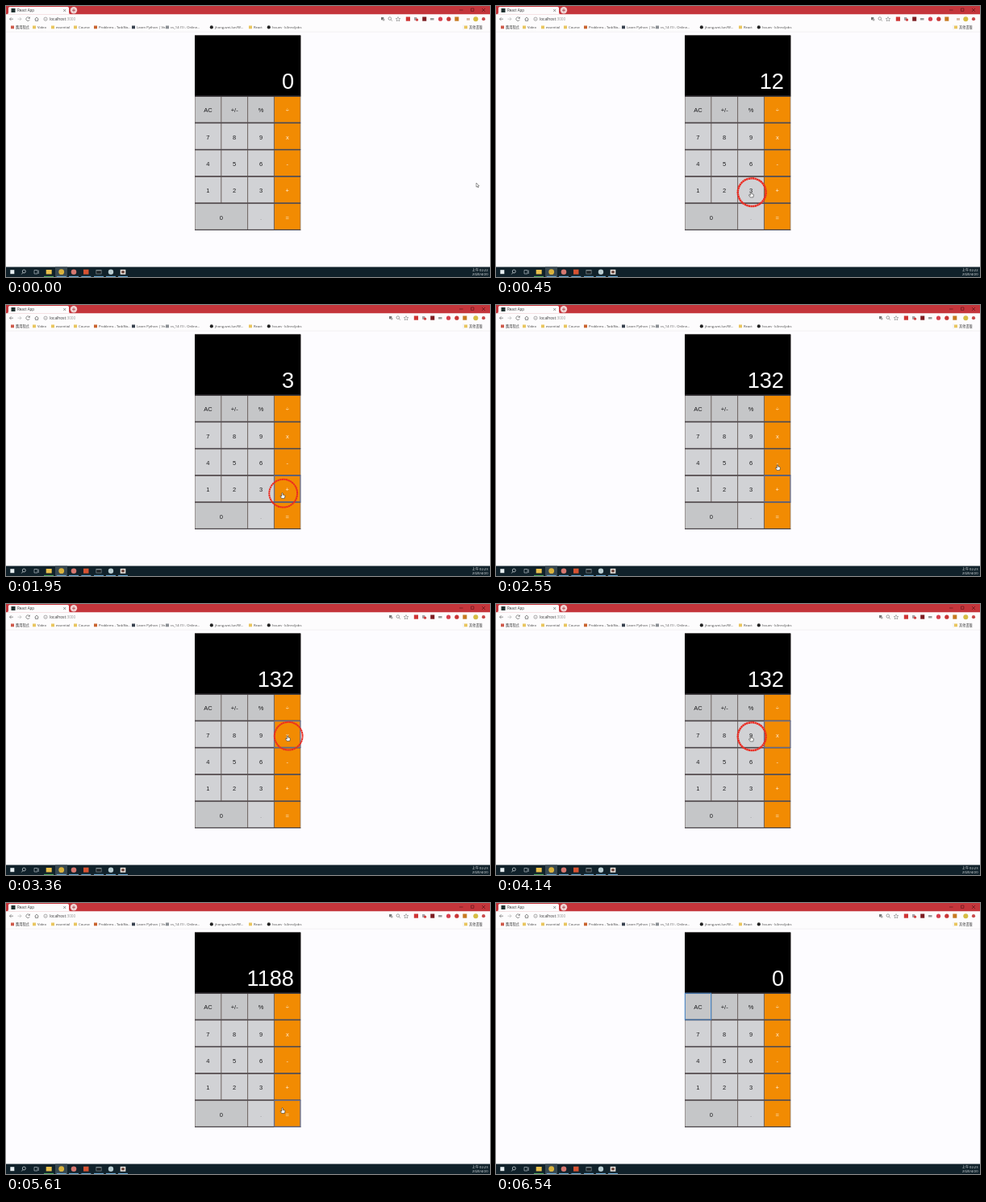
Animation of 600 by 337 pixels, one loop 6600 ms. Source, as an HTML page:

```html
<!DOCTYPE html>
<html lang="zh-Hant">
<head>
<meta charset="utf-8">
<title>Calculator demo</title>
<style>
html, body { margin: 0; width: 100%; height: 100%; overflow: hidden; background: #fdfcff; }
svg { display: block; width: 100vw; height: 100vh; }
text { font-family: "Liberation Sans", Arial, sans-serif; }
.ui { font-family: "Open Sans", "Noto Sans CJK TC", "Noto Sans CJK", sans-serif; }
</style>
</head>
<body>
<svg id="stage" viewBox="0 0 600 337" preserveAspectRatio="none"></svg>
<script>
const NS = "http://www.w3.org/2000/svg";
const stage = document.getElementById("stage");
const LOOP = 6600, STEP = 30;

function add(tag, attrs, parent = stage) {
  const el = document.createElementNS(NS, tag);
  for (const key in attrs) el.setAttribute(key, attrs[key]);
  parent.appendChild(el);
  return el;
}
const rect = (x, y, width, height, fill, parent) => add("rect", { x, y, width, height, fill }, parent);
const dot = (cx, cy, r, fill, parent) => add("circle", { cx, cy, r, fill }, parent);
const line = (d, stroke, width = 0.7, parent) =>
  add("path", { d, stroke, "stroke-width": width, fill: "none" }, parent);
function label(str, x, y, size, fill, more = {}, parent) {
  const el = add("text", { x, y, "font-size": size, fill, ...more }, parent);
  el.textContent = str;
  return el;
}
const ui = (str, x, y, size, fill, more = {}) => label(str, x, y, size, fill, { class: "ui", ...more });

// Browser window
rect(0, 0, 600, 337, "#fdfcff");
rect(0, 0, 600, 10.5, "#c4353b");
add("path", { d: "M1 10.5 Q3 10 3 8 V2.5 Q3 1 5 1 H76 Q78 1 78 2.5 V8 Q78 10 80 10.5Z", fill: "#fdfcfd" });
rect(6.5, 3, 5, 5, "#20302f");
ui("React App", 14, 7.4, 4.5, "#333");
line("M71.2 4 l3 3 m0 -3 l-3 3", "#555", 0.6);
dot(84, 5.3, 4.2, "#f0d4d4");
line("M82 5.3 h4 M84 3.3 v4", "#a3333a", 0.7);
line("M562 5 h4.5 M576.5 3 h3.4 v3.4 h-3.4z M590 3 l4 4 m0 -4 l-4 4", "#4d1518", 0.6);

rect(0, 10.5, 600, 21.5, "#fdfcfd");
line("M9 16.2 H4.5 m2 -2 l-2 2 l2 2", "#666");
line("M14.5 16.2 h4.5 m-2 -2 l2 2 l-2 2", "#b5b5b5");
line("M29 14.8 a2.3 2.3 0 1 0 .3 2.2 M29.4 13.6 v1.8 h-1.8", "#666");
line("M35.6 16.3 l2.4 -2.3 l2.4 2.3 M36.4 16 v2.5 h3.2 v-2.5", "#666");
add("circle", { cx: 49, cy: 16.2, r: 2.1, fill: "none", stroke: "#777", "stroke-width": 0.6 });
line("M49 15.8 v1.5", "#777", 0.5);
const address = ui("localhost", 54, 18, 4.8, "#333");
const port = add("tspan", { fill: "#999" }, address);
port.textContent = ":3000";

// Toolbar icons that shift when one of them goes away
const tools = add("g", {});
rect(475, 14, 3.3, 3.3, "#777", tools);
rect(477, 16, 2.4, 2.4, "#aaa", tools);
line("M487.2 17 l1.7 1.7 M487.6 15.6 a1.8 1.8 0 1 1 -3.6 0 a1.8 1.8 0 0 1 3.6 0", "#666", 0.6, tools);
line("M496 13.6 l.8 1.8 l2 .2 l-1.5 1.3 l.5 1.9 l-1.8 -1 l-1.8 1 l.5 -1.9 l-1.5 -1.3 l2 -.2z", "#666", 0.5, tools);
rect(505.8, 13.5, 5.2, 5.2, "#cf3434", tools);
rect(516, 14, 3.3, 3.8, "#a6a0a5", tools);
dot(519.5, 17.2, 1.6, "#d04040", tools);
rect(526.2, 13.5, 5, 5.2, "#7d1d22", tools);
rect(536, 15, 4.5, 2.5, "#999", tools);
dot(548.5, 16.2, 2.6, "#d8404e", tools);
dot(558.8, 16.2, 2.6, "#c93636", tools);
rect(566.3, 13.5, 5, 5.2, "#c77a20", tools);
const extra = add("g", {});
rect(571, 15, 4, 2.8, "#d9b9a5", extra);
dot(582.3, 16.2, 3, "#d6bd45");
dot(592, 16.2, 2.1, "#c94b4b");

// Bookmarks
const marks = [
  ["應用程式", 12, "#cf5a4a"], ["Video", 39, "#e9c65f"], ["essential", 62, "#e9c65f"],
  ["Course", 90, "#e9c65f"], ["Problems - TaskNo...", 115, "#c9632e"],
  ["Learn Python | Ve...", 162, "#39424f"], ["cs_14 (1) - Online...", 204, "#8a8f94"],
  ["jhong-wei-lun/W...", 259, "#222"], ["React", 307, "#e9c65f"],
  ["Issues · k4nro/jobs", 330, "#222"], ["其他書籤", 574, "#e9c65f"]
];
for (const [name, x, color] of marks) {
  if (color === "#222") dot(x - 4.2, 26.4, 2.1, color);
  else rect(x - 6, 24.5, 4, 3.8, color);
  ui(name, x, 28, 4.2, "#444");
}
line("M567 23.5 v6", "#ddd", 0.5);
line("M0 32.2 H600", "#e6e3e6", 0.5);

// Taskbar
rect(0, 324.5, 600, 12.5, "#10212a");
rect(5.3, 328.2, 5, 5, "#e5edf0");
line("M24.3 330 a2 2 0 1 1 -4 0 a2 2 0 0 1 4 0 M21 331.5 l-1.7 2", "#dfe6e9", 0.7);
line("M35 328.5 h4 v4.5 h-4z M40.3 328.5 v4.5", "#c9d3d7", 0.6);
rect(61, 324.5, 15, 12.5, "#374750");
rect(49.7, 328, 7, 5.5, "#e9c04b");
dot(68.7, 330.7, 3.4, "#d9b23d");
dot(84, 330.7, 3.3, "#d67870");
rect(96, 327.7, 6.5, 6, "#d65332");
rect(111.5, 328, 7, 5.4, "#7e8b90");
rect(112.2, 329.4, 5.6, 3.3, "#1a1f22");
dot(130, 330.7, 3.2, "#b9cdd2");
rect(141.7, 327.8, 6.6, 6, "#ece6e0");
rect(143.2, 329.3, 3.6, 3, "#653f36");
for (const x of [53, 68.7, 84, 99.3, 115, 130, 145]) {
  rect(x - 6, 335.9, 12, 1.1, x === 53 ? "#4da862" : "#6aa6cf");
}
const clock = ui("", 597.5, 329.5, 4.1, "#eef2f4", { "text-anchor": "end" });
ui("2020/4/20", 597.5, 335.4, 4.1, "#eef2f4", { "text-anchor": "end" });

// Calculator
const LEFT = 234, TOP = 112, COL = 32.8, ROW = 33.3;
rect(LEFT, 36.5, 131.3, 242.5, "#6d625e");
rect(LEFT, 36.5, 131.3, 76, "#000");
const screen = label("0", 357, 103.2, 27.2, "#fff", { "text-anchor": "end" });

function key(str, col, row, span = 1) {
  const x = LEFT + col * COL, y = TOP + row * ROW, w = span * COL;
  const op = col === 3;
  const fill = op ? "#f28b02" : row === 0 || span === 2 ? "#c5c6c8" : "#d1d2d5";
  rect(x + 0.5, y + 0.9, w - 1, ROW - 1.7, fill);
  const ink = op ? "#fff3df" : str === "." ? "#85868a" : "#1d1d1f";
  label(str, x + w / 2, y + 20.3, 7.5, ink, { "text-anchor": "middle" });
}
[["AC", "+/-", "%", "÷"], ["7", "8", "9", "x"], ["4", "5", "6", "-"], ["1", "2", "3", "+"]]
  .forEach((keys, row) => keys.forEach((str, col) => key(str, col, row)));
key("0", 0, 4, 2);
key(".", 2, 4);
key("=", 3, 4);
for (let row = 0; row < 6; row++) line(`M${LEFT} ${TOP + row * ROW} h131.3`, "#47434a", 1);

// Focus outline, click ring, pointer
const focus = add("rect", { width: COL - 0.6, height: ROW - 0.4, fill: "none", "stroke-width": 1 });
const ring = add("circle", { fill: "none", stroke: "#ec2a20" });
const arrow = add("path", {
  d: "M0 0 V5.2 L1.2 4.1 L2 5.9 L2.8 5.5 L2 3.8 H3.6Z",
  fill: "#fff", stroke: "#333", "stroke-width": 0.5
});
const hand = add("path", {
  d: "M-.7 .5 Q0 -.4 .7 .5 V2.6 L2.7 3 Q3.5 3.2 3.4 4 L2.8 6.9 H-.8 L-2.4 4.5 Q-2.6 3.5 -1.6 3.8 L-.7 4.5Z",
  fill: "#fff", stroke: "#222", "stroke-width": 0.55
});

// Pointer stops: time, x, y
const path = [
  [0, 583, 220], [30, 583, 220], [190, 251, 231], [250, 251, 231], [310, 284, 231], [360, 284, 231],
  [410, 316, 231], [480, 316, 231], [550, 349, 232], [860, 349, 232], [980, 316, 232.5],
  [1530, 316, 232.5], [1830, 342.5, 233.5], [2370, 342.5, 233.5], [2550, 349, 198.5],
  [2880, 349, 190], [3240, 349, 163.5], [3630, 349, 163.5], [4080, 316, 164], [4380, 316, 164],
  [4860, 321, 229], [5020, 348, 262], [5580, 348, 262], [5790, 250, 130], [5960, 250, 130],
  [6240, 604, 205]
];
// Clicks: press time, value shown afterwards, focused [col, row]
const clicks = [
  [210, "1"], [320, "12"], [430, "123"], [570, "123", [3, 3]], [1140, "3"],
  [1890, "126", [3, 3]], [2070, "129", [3, 3]], [2220, "132", [3, 3]],
  [3300, "132", [3, 1]], [4110, "9"], [5070, "1188", [3, 4]], [5820, "0", [0, 0]]
];
const RING = 130, RESULT = 75;

function pointerAt(t) {
  const i = path.findIndex(p => p[0] > t);
  if (i < 0) return path[path.length - 1].slice(1);
  const [t0, x0, y0] = path[i - 1], [t1, x1, y1] = path[i];
  const u = (t - t0) / (t1 - t0), k = u * u * (3 - 2 * u);
  return [x0 + (x1 - x0) * k, y0 + (y1 - y0) * k];
}
const show = (el, on) => el.setAttribute("visibility", on ? "visible" : "hidden");
const move = (el, x, y) => el.setAttribute("transform", `translate(${x} ${y})`);

function draw(time) {
  const t = Math.floor(time / STEP) * STEP;
  const [x, y] = pointerAt(t);
  let value = "0", focused = null, pressed = null;
  for (const [at, shown, spot] of clicks) {
    if (t < at) break;
    if (t >= at + RESULT) value = shown;
    if (spot) focused = spot;
    if (t < at + RING) pressed = at;
  }
  screen.textContent = value;

  show(focus, focused);
  if (focused) {
    focus.setAttribute("x", LEFT + focused[0] * COL + 0.3);
    focus.setAttribute("y", TOP + focused[1] * ROW + 0.2);
    focus.setAttribute("stroke", focused[0] ? "#626f9a" : "#4a8bd0");
  }

  show(ring, pressed !== null);
  if (pressed !== null) {
    const early = t - pressed < 45;
    ring.setAttribute("cx", x + 1.2);
    ring.setAttribute("cy", y + 0.7);
    ring.setAttribute("r", 17.4);
    ring.setAttribute("stroke-width", early ? 2.5 : 2);
    ring.setAttribute("stroke-dasharray", "2.3 .35");
  }

  const overKeys = x > LEFT && x < 365 && y > TOP && y < 279;
  show(hand, overKeys);
  show(arrow, !overKeys && t < 6240);
  move(hand, x, y);
  move(arrow, x, y);

  const later = t >= 600;
  move(tools, later ? 0 : -10, 0);
  show(extra, !later);
  clock.textContent = later ? "上午 02:23" : "上午 02:22";
}

function tick() {
  draw(performance.now() % LOOP);
  requestAnimationFrame(tick);
}
tick();
</script>
</body>
</html>
```
